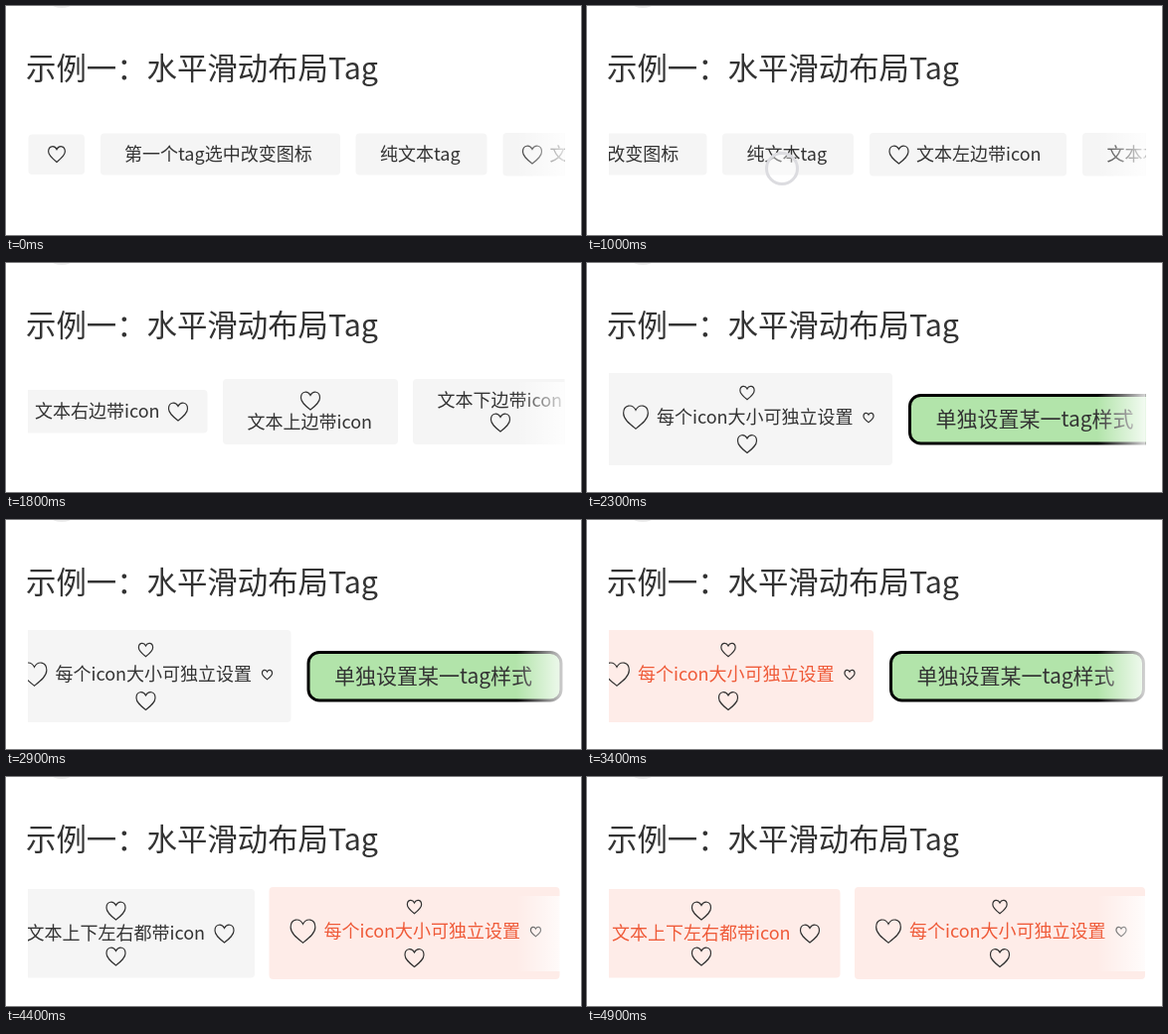
Animation, 578 px wide and 231 px high, one loop 5 s. Source, as an HTML page:

```html
<!DOCTYPE html>
<html lang="zh-CN">
<head>
<meta charset="utf-8">
<title>Tag</title>
<style>
  html, body { margin: 0; width: 100%; height: 100%; overflow: hidden; background: #fff; }
  svg { display: block; width: 100%; height: 100%; }
  text { font-family: "Noto Sans CJK SC", "Noto Sans CJK", "Noto Sans", sans-serif; font-size: 18px; fill: #333; }
  .heart { fill: none; stroke: #333; stroke-width: 1.2; vector-effect: non-scaling-stroke; }
  .tag rect { fill: #f5f5f5; }
  .tag.on rect { fill: #feece8; }
  .tag.on text { fill: #ef5a38; }
  .tag.green rect { fill: #b2e4aa; stroke: #000; stroke-width: 3; }
  .tag.green text { font-size: 21px; }
</style>
</head>
<body>
<svg viewBox="0 0 578 231">
  <defs>
    <clipPath id="view"><rect x="22" y="100" width="539.5" height="131"/></clipPath>
    <linearGradient id="fade">
      <stop offset="0" stop-color="#fff" stop-opacity="0"/>
      <stop offset="1" stop-color="#fff" stop-opacity=".85"/>
    </linearGradient>
  </defs>
  <circle cx="56" cy="-18" r="20" fill="#ececec"/>
  <text x="20" y="73.5" style="font-size:30.4px">示例一：水平滑动布局Tag</text>
  <g clip-path="url(#view)">
    <g id="row"></g>
    <rect x="513" y="120" width="49" height="76" fill="url(#fade)"/>
  </g>
  <circle id="touch" r="15.5" fill="#fff" fill-opacity=".4" stroke="#dcdce0" stroke-width="3"/>
</svg>
<script>
const LOOP = 5000, STEP = 100;
const HEART = 'M0 9C-5 5-9.5 1.5-9.5-3C-9.5-10-2.5-10.5 0-5.5C2.5-10.5 9.5-10 9.5-3C9.5 1.5 5 5 0 9Z';
const row = document.getElementById('row');
const touch = document.getElementById('touch');

function add(parent, name, attrs) {
  const el = document.createElementNS('http://www.w3.org/2000/svg', name);
  for (const k in attrs) el.setAttribute(k, attrs[k]);
  return parent.appendChild(el);
}

// label and hearts are placed relative to the tag's left edge
function tag(x, y, w, h, label, hearts = [], cls = '', r = 4) {
  const g = add(row, 'g', { class: 'tag ' + cls, transform: `translate(${x} 0)` });
  add(g, 'rect', { y, width: w, height: h, rx: r });
  if (label) add(g, 'text', { x: label[1], y: label[2] }).textContent = label[0];
  for (const [hx, hy, s = 1] of hearts)
    add(g, 'path', { class: 'heart', d: HEART, transform: `translate(${hx} ${hy}) scale(${s})` });
  return g;
}

tag(22.5, 129.5, 56.5, 40.5, null, [[28.5, 149.5, .88]]);
tag(95, 128.5, 241, 42, ['第一个tag选中改变图标', 24, 156]);
tag(351.5, 128.5, 132, 42, ['纯文本tag', 24.5, 156]);
tag(499.5, 128, 198, 43.5, ['文本左边带icon', 47, 156], [[29.5, 150]]);
tag(713.5, 128, 198, 43.5, ['文本右边带icon', 24.5, 156], [[168.5, 150]]);
tag(927, 117, 176, 66, ['文本上边带icon', 24.5, 167], [[88, 139]]);
tag(1118, 117, 176, 66, ['文本下边带icon', 24.5, 144.5], [[88, 161]]);
const four = tag(1310, 113, 279.5, 89.5, ['文本上下左右都带icon', 50, 163.5],
  [[31, 158], [140, 135], [140, 181], [249, 158]]);
const sizes = tag(1604, 111, 292, 93, ['每个icon大小可独立设置', 55, 162],
  [[34, 155.5, 1.3], [146, 131, .75], [146, 182.5], [268, 156, .53]]);
tag(1913.5, 133.5, 254, 48.5, ['单独设置某一tag样式', 26, 165], [], 'green', 11);

// piecewise-linear value from [time, ...values] keys
function at(keys, t) {
  if (t <= keys[0][0]) return keys[0].slice(1);
  for (let i = 1; i < keys.length; i++) {
    const a = keys[i - 1], b = keys[i];
    if (t <= b[0]) {
      const p = (t - a[0]) / (b[0] - a[0]);
      return a.slice(1).map((v, j) => v + (b[j + 1] - v) * p);
    }
  }
  return keys[keys.length - 1].slice(1);
}

const SCROLL = [
  [600, 0], [700, 16], [800, 70], [1000, 215.5], [1200, 385], [1400, 520],
  [1600, 627], [1800, 709], [1900, 750], [2000, 890], [2200, 1410], [2300, 1589],
  [2400, 1660], [2500, 1676], [2600, 1658], [2800, 1619], [2900, 1609.5], [3100, 1608],
  [3700, 1608], [3800, 1580], [4000, 1407], [4100, 1370], [4300, 1343], [4500, 1336],
  [4600, 1336], [4700, 1335]
];
const TOUCHES = [
  [[700, 395, 164], [1000, 196, 164], [1100, 120, 164]],
  [[1900, 470, 160], [2000, 340, 170], [2200, 70, 215]],
  [[3300, 150, 160], [3300, 150, 160]],
  [[3800, 318, 185], [4000, 491, 163], [4200, 541, 65]],
  [[4700, 130, 160], [4800, 130, 160]]
];

function draw(t) {
  row.setAttribute('transform', `translate(${-at(SCROLL, t)[0]} 0)`);
  sizes.classList.toggle('on', t >= 3300);
  four.classList.toggle('on', t >= 4800);
  const path = TOUCHES.find(k => t >= k[0][0] && t <= k[k.length - 1][0]);
  touch.style.display = path ? '' : 'none';
  if (path) {
    const [x, y] = at(path, t);
    touch.setAttribute('cx', x);
    touch.setAttribute('cy', y);
  }
}

const start = performance.now();
function tick() {
  const t = (performance.now() - start) % LOOP;
  draw(Math.floor(t / STEP) * STEP);
  requestAnimationFrame(tick);
}
tick();
</script>
</body>
</html>
```
